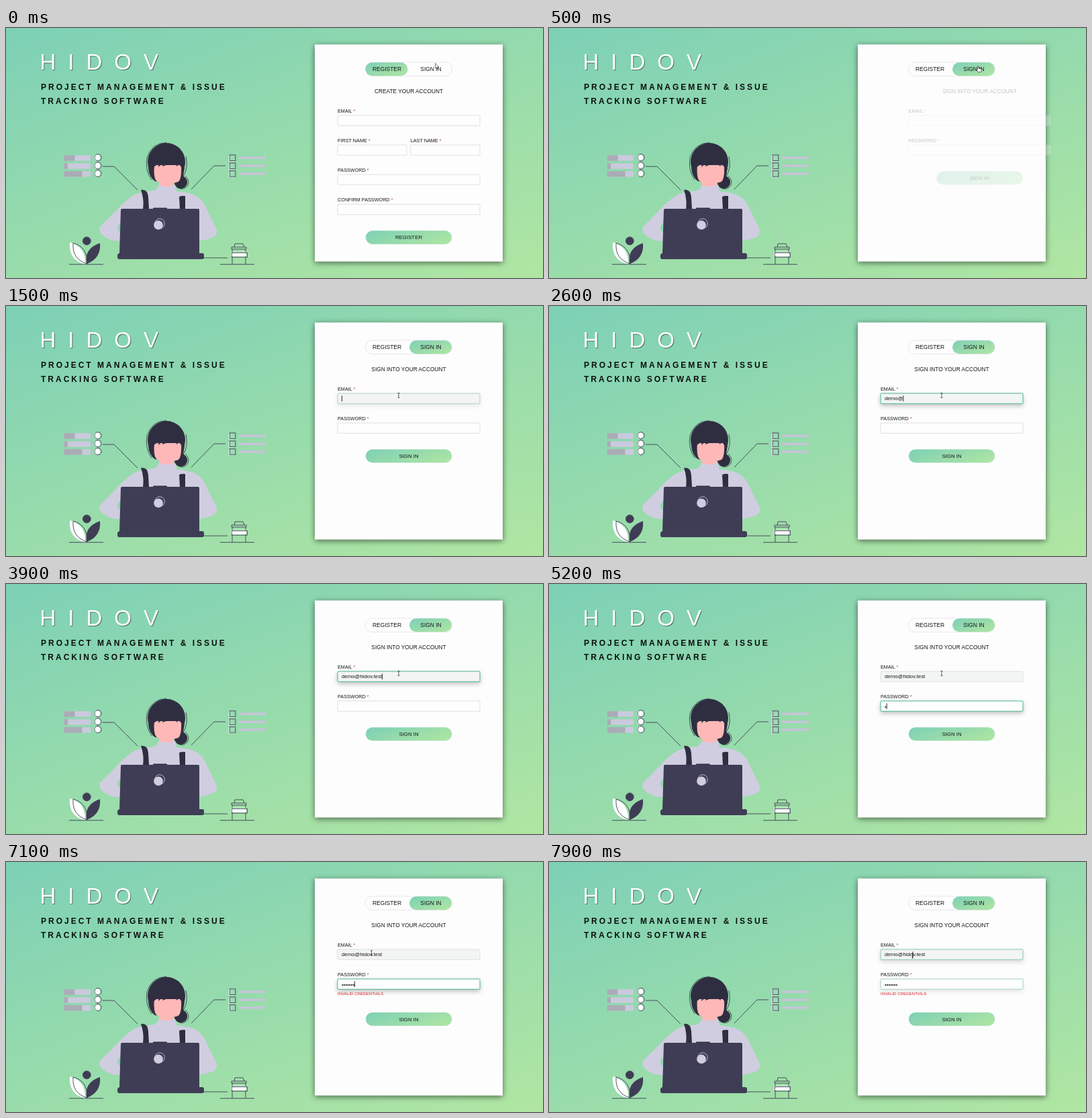
Animation of 800 by 372 pixels, one loop 8000 ms. Source, as an HTML page:

```html
<!DOCTYPE html>
<html lang="en">
<head>
<meta charset="utf-8">
<title>Sign in</title>
<style>
  html, body { margin: 0; height: 100%; overflow: hidden; }
  body { background: linear-gradient(160deg, #7dd0b6, #b0e6a2); }
  svg { display: block; width: 800px; height: 372px; font-family: "Liberation Sans", Arial, sans-serif; }
  .brand { font-size: 33px; letter-spacing: 18px; fill: #fff; filter: drop-shadow(1.5px 1.5px .6px rgba(40, 60, 55, .65)); }
  .tagline { font-size: 12px; font-weight: bold; letter-spacing: 3px; fill: #0c0f0e; }
  .panel { fill: #fdfdfe; filter: drop-shadow(0 2px 4px rgba(0, 0, 0, .55)); }
  .mid { text-anchor: middle; }
  .heading { font-size: 8.3px; }
  .tab { font-size: 8.45px; }
  .button { font-size: 7.85px; }
  .label { font-size: 7.25px; }
  .value { font-size: 7.8px; white-space: pre; }
  .error { font-size: 6.18px; fill: #d22; }
  .field { fill: #fefefe; stroke: #e0e0e5; stroke-width: 1; }
</style>
</head>
<body>
<svg viewBox="0 0 800 372" fill="#17171b">
  <defs>
    <linearGradient id="buttonFill" gradientUnits="userSpaceOnUse" x1="-10.6" y1="-29.1" x2="10.6" y2="29.1">
      <stop stop-color="#7dd0b6"/><stop offset="1" stop-color="#b0e6a2"/>
    </linearGradient>
    <linearGradient id="pillFill" gradientUnits="userSpaceOnUse" x1="-6.8" y1="-18.8" x2="6.8" y2="18.8">
      <stop stop-color="#7dd0b6"/><stop offset="1" stop-color="#b0e6a2"/>
    </linearGradient>
  </defs>

  <text class="brand" x="50.5" y="61.5">HIDOV</text>
  <text class="tagline" x="52" y="92">PROJECT MANAGEMENT &amp; ISSUE</text>
  <text class="tagline" x="52" y="113">TRACKING SOFTWARE</text>

  <g id="lists"></g>

  <!-- woman -->
  <g fill="#2f2e41">
    <ellipse cx="239" cy="199.5" rx="28" ry="28.5"/>
    <path d="M212 208Q213 222 222 228L262 232L266 208Z"/>
    <circle cx="260.5" cy="229.5" r="9.7"/>
    <g fill="none" stroke="#2f2e41" stroke-width=".8">
      <path d="M217 226Q207 212 210 193Q217 171 239 170.5M268 191Q272 208 264 221"/>
      <path d="M267 220Q274 227 271 234Q266 241 259 239"/>
    </g>
  </g>
  <path fill="#d0cde1" d="M227 234Q239 230 252 234L254 243Q276 245 285 251Q296 259 302 276L314 300Q316 309 305 313L288 317H171Q157 318 146 310Q137 304 140 296L163 273Q174 260 188 250Q200 243 220 242Q226 240 227 234Z"/>
  <path fill="#93d8af" d="M171 289Q165 294 166 299Q168 304 171 304Z"/>
  <g fill="#ffb8b8">
    <path d="M228 224H249L250 234Q239 238 228 234Z"/>
    <path d="M221 204Q219 226 226 229Q241 235 256 229Q262 226 261 204Z"/>
  </g>
  <path fill="#2f2e41" d="M214 195H265L261 207L257 201L255 206L250 200L233 206L235 200L227 207L228 201L219 208Z"/>
  <g fill="#2f2e41">
    <path d="M201 241Q211 239 212 252L213 270H204Q206 254 201 241Z"/>
    <path d="M258 251Q262 249 267 250V270H259Z"/>
  </g>
  <g fill="#3f3d56">
    <rect x="219" y="267.5" width="21" height="4" rx="1" fill="#2f2e41"/>
    <path d="M173 269H286Q288 269 288 271V335H292Q295 335 295 338V341Q295 344 292 344H169Q166 344 166 341V338Q166 336 169 335L171 271Q171 269 173 269Z"/>
  </g>
  <circle cx="227" cy="293.3" r="6.8" fill="#d0cde1"/>
  <circle cx="229" cy="291" r="7.3" fill="none" stroke="#d0cde1" stroke-width=".8"/>

  <!-- plant and flask -->
  <g fill="none" stroke="#3f3d56" stroke-width=".9">
    <path d="M94 351.7H145M319 351.7H370M295 342H330"/>
    <circle cx="120.3" cy="316.8" r="5.9" fill="#3f3d56"/>
    <path stroke="none" fill="#3f3d56" d="M120 351Q116 328 140 320Q142 343 120 351Z"/>
    <path stroke="none" fill="#fff" d="M118 351.5Q93 346 95 319Q119 325 118 351.5Z"/>
    <path d="M121 351Q98 344 100 320Q122 326 121 351Z"/>
    <path d="M340 326L341 321H353L355 326M336 326H358V329H336ZM337 329V351.5M357 329V351.5"/>
    <rect x="335" y="333.5" width="23" height="6.5" fill="#fff" stroke="none"/>
    <rect x="336.3" y="334.5" width="23" height="6.5"/>
    <path stroke="#b5cfc6" d="M345.5 299V317"/>
  </g>

  <rect class="panel" x="460" y="24.5" width="280" height="323"/>
  <rect x="535.5" y="51" width="129" height="20.5" rx="10.25" fill="#fefefe" stroke="#e5e5e8" stroke-width=".9"/>
  <g id="pill"><rect x="-31.5" y="-10" width="63" height="20" rx="10" fill="url(#pillFill)"/></g>
  <text class="tab mid" x="567.5" y="64.2">REGISTER</text>
  <text class="tab mid" x="633" y="64.2">SIGN IN</text>
  <g id="registerForm"></g>
  <g id="signInForm"></g>
  <g id="mouse"></g>
</svg>

<script>
const $ = id => document.getElementById(id);
const move = (node, x, y = 0) => node.setAttribute('transform', `translate(${x} ${y})`);
const ramp = (t, from, to) => Math.min(1, Math.max(0, (t - from) / (to - from)));
const smooth = u => u * u * (3 - 2 * u);

// Static pieces
$('lists').innerHTML = [193.5, 205.5, 217.2].map((y, i) => `
  <rect x="86.5" y="${y - 4.2}" width="39.5" height="8.4" fill="#cbc9dd"/>
  <rect x="86.5" y="${y - 4.2}" width="${[16, 5.5, 27][i]}" height="8.4" fill="#a9adb5"/>
  <circle cx="135.8" cy="${y - .6}" r="4.8" fill="#fff"/>
  <circle cx="137" cy="${y - .8}" r="5" fill="none" stroke="#3f3d56" stroke-width=".9"/>
  <rect x="331.8" y="${y - 4}" width="9" height="9" fill="#fff"/>
  <rect x="333.2" y="${y - 4.6}" width="8.6" height="8.6" fill="#9bd9b5" stroke="#3f3d56" stroke-width=".9"/>
  <rect x="347" y="${y - 2.2}" width="40" height="3.6" fill="#c5c5d8"/>`).join('') +
  '<path d="M144 206H161L196 241M327 205H310L276 240" fill="none" stroke="#3f3d56" stroke-width=".9"/>';

const heading = text => `<text class="heading mid" x="600" y="97.2">${text}</text>`;
const field = (label, x, y, width, id = '') => `
  <text class="label" x="${x}" y="${y - 4.2}">${label} <tspan fill="#b8404a">*</tspan></text>
  <rect class="field" id="${id}" x="${x}" y="${y}" width="${width}" height="15.3" rx="1"/>`;
const button = (label, y, id = '') => `
  <g id="${id}" transform="translate(600 ${y})">
    <rect x="-64" y="-9.8" width="128" height="19.6" rx="9.8" fill="url(#buttonFill)" stroke="#9fd8b4" stroke-width=".5"/>
    <text class="button mid" y="2.7">${label}</text>
  </g>`;

$('registerForm').innerHTML = heading('CREATE YOUR ACCOUNT') +
  field('EMAIL', 494, 130, 212) +
  field('FIRST NAME', 494, 174, 103) + field('LAST NAME', 602.7, 174, 103.3) +
  field('PASSWORD', 494, 218, 212) + field('CONFIRM PASSWORD', 494, 262.3, 212) +
  button('REGISTER', 311.6);
$('signInForm').innerHTML = heading('SIGN INTO YOUR ACCOUNT') +
  field('EMAIL', 494, 130, 212, 'email') + field('PASSWORD', 494, 174, 212, 'password') +
  `<text class="value" id="emailText" x="500" y="140.3"></text>
   <text class="value" id="passwordText" x="500" y="184.5"></text>
   <rect id="caret" width=".9" height="8.6"/>
   <text class="error" id="error" x="494" y="197.8">INVALID CREDENTIALS</text>` +
  button('SIGN IN', 223.2, 'submit');
const submitLabel = $('submit').querySelector('text');

// Timeline, in ms
const LOOP = 8000;
const EMAIL = 'demo@hidov.test';
const emailKeys = [20, 21, 22, 23, 26, 30, 31, 32, 33, 34, 36, 37, 38, 38.5, 39].map(t => t * 100 - 50);
const passwordKeys = Array.from({ length: 7 }, (_, i) => 5150 + i * 100);
const FOCUS_EMAIL = 1400, FOCUS_PASSWORD = 3950, SUBMIT = 5950, REJECT = 6350, REFOCUS = 7750;
const caretEvents = [FOCUS_EMAIL, FOCUS_PASSWORD, SUBMIT, REFOCUS, ...emailKeys, ...passwordKeys];
const mousePath = [
  [0, 639.5, 52.5], [100, 639.5, 52.5], [200, 638.5, 56.5], [950, 638.5, 56.5],
  [1400, 585, 133], [6800, 585, 133], [7350, 514, 137], [7700, 541.5, 139.5], [LOOP, 541.5, 139.5]];
const cursors = {
  arrow: '<path d="M0 0V7.6L1.8 6L3.1 8.9L4.2 8.4L3 5.6H5.4Z" fill="#fff" stroke="#222" stroke-width=".6"/>',
  hand: '<path d="M0 .6Q.8-.3 1.6.6V3.6L5.4 4.4Q6 5 5.6 7L5 9H.8L-1.8 5.7Q-1.4 4.7 0 5.6Z" fill="#fff" stroke="#222" stroke-width=".7"/>',
  beam: '<path d="M-1.5-3.4H1.5M0-3.4V3.4M-1.5 3.4H1.5" fill="none" stroke="#222" stroke-width=".7"/>'
};

const typed = (t, keys) => keys.filter(key => key <= t).length;

function mouseAt(t) {
  const i = mousePath.findIndex(p => p[0] > t);
  const [t0, x0, y0] = mousePath[i - 1], [t1, x1, y1] = mousePath[i];
  const u = smooth(ramp(t, t0, t1));
  return [x0 + (x1 - x0) * u, y0 + (y1 - y0) * u];
}

function paintField(node, focus, hovered) {
  const mix = (a, b) => Math.round(a + (b - a) * focus);
  node.style.stroke = `rgb(${mix(224, 78)},${mix(224, 184)},${mix(229, 136)})`;
  node.style.fill = hovered ? '#f3f4f4' : '#fefefe';
  node.style.filter = focus ? `drop-shadow(0 3px 3px rgba(0,0,0,${.24 * focus}))` : 'none';
}

function draw(t) {
  move($('pill'), 567 + 65.5 * smooth(ramp(t, 50, 450)), 61.3);

  const leave = ramp(t, 80, 430), enter = ramp(t, 430, 1050);
  move($('registerForm'), -41 * leave * leave);
  $('registerForm').style.opacity = 1 - leave;
  move($('signInForm'), 53 * (1 - enter) ** 2);
  $('signInForm').style.opacity = ramp(t, 430, 730);

  const [x, y] = mouseAt(t);
  const onEmail = t > 1000 && y > 130 && y < 145;
  const kind = t < 150 ? 'arrow' : t < 1020 ? 'hand' : onEmail ? 'beam' : 'arrow';
  $('mouse').innerHTML = cursors[kind];
  move($('mouse'), x, y);

  const toEmail = ramp(t, FOCUS_EMAIL, FOCUS_EMAIL + 300);
  const toPassword = ramp(t, FOCUS_PASSWORD, FOCUS_PASSWORD + 300);
  const back = ramp(t, REFOCUS, REFOCUS + 250);
  paintField($('email'), toEmail - toPassword + back, onEmail);
  paintField($('password'), toPassword - back, false);

  $('emailText').textContent = EMAIL.slice(0, typed(t, emailKeys));
  $('passwordText').textContent = '•'.repeat(typed(t, passwordKeys));

  const inPassword = t >= FOCUS_PASSWORD && t < REFOCUS;
  const text = $(inPassword ? 'passwordText' : 'emailText');
  const lastEvent = Math.max(...caretEvents.filter(e => e <= t));
  const caretOn = t >= FOCUS_EMAIL && Math.floor((t - lastEvent) / 500) % 2 === 0;
  $('caret').setAttribute('x', t >= REFOCUS ? 541.6 : 500 + text.getComputedTextLength());
  $('caret').setAttribute('y', inPassword ? 177.5 : 133.4);
  $('caret').style.opacity = caretOn ? 1 : 0;

  const rejected = ramp(t, REJECT, REJECT + 250);
  $('error').style.opacity = rejected;
  move($('submit'), 600, 223.2 + 10.6 * smooth(rejected));
  submitLabel.textContent = t >= SUBMIT && t < REJECT ? 'SIGNING IN...' : 'SIGN IN';
}

function tick() {
  draw(performance.now() % LOOP);
  requestAnimationFrame(tick);
}
tick();
</script>
</body>
</html>
```
